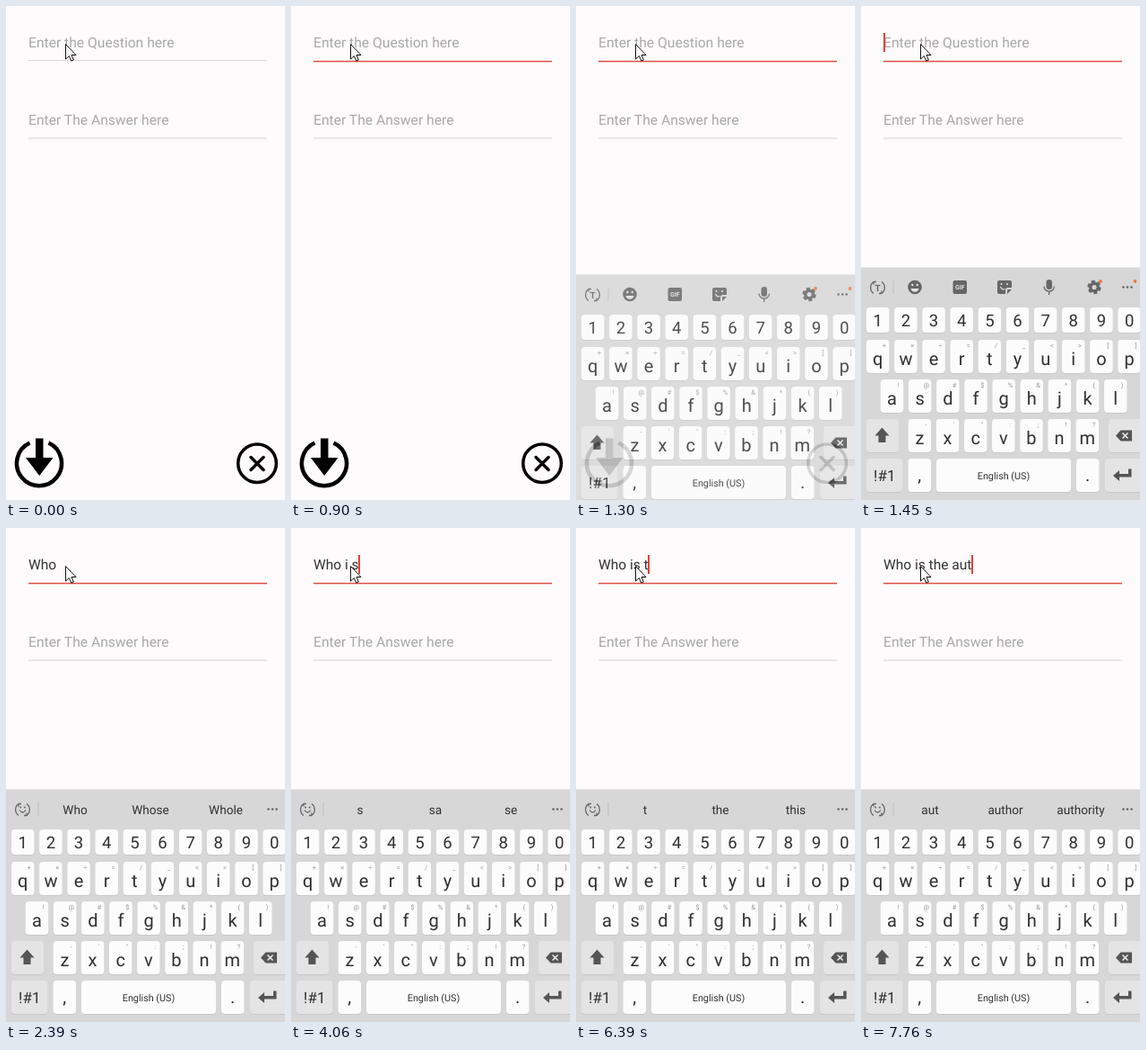
Animation of 311 by 549 pixels, one loop 8000 ms. Source, as an HTML page:

```html
<!DOCTYPE html>
<html lang="en">
<head>
<meta charset="utf-8">
<title>Question form</title>
<style>
html, body { margin: 0; width: 100%; height: 100%; overflow: hidden; background: #fdfbfc; }
svg { display: block; }
text { font-family: Roboto, Arial, sans-serif; white-space: pre; text-rendering: geometricPrecision; }
.mid { text-anchor: middle; fill: #303030; }
.field { font-size: 15.5px; fill: #333; }
.hint { font-size: 15.65px; fill: #a9a8a9; }
.tiny { font-size: 7.5px; fill: #999; }
.line { fill: none; stroke: #666; stroke-width: 1.3; }
.icon { fill: #666; }
.dot { fill: #ee7a3c; }
</style>
</head>
<body>
<svg id="stage" width="311" height="549" viewBox="0 0 311 549">
  <rect width="311" height="549" fill="#fdfbfc"/>
  <rect id="rule" x="25" width="266"/>
  <rect x="25" y="146.5" width="266" height="1" fill="#d3d1d2"/>
  <text class="field" id="question" x="25" y="46"></text>
  <text class="field hint" x="25" y="132">Enter The Answer here</text>
  <rect id="caret" y="30" width="2" height="21" fill="#e2423a"/>

  <g fill="none" stroke="#000">
    <path d="M26.5 485.5A25 25 0 1 0 47.5 485.5" stroke-width="4.5"/>
    <path d="M33 480.5H41.5V502H52.5L37.2 522L22 502H33Z" fill="#000" stroke="none"/>
    <circle cx="280" cy="508.3" r="21.3" stroke-width="3.5"/>
    <path d="M273 501.5L287 515.5M287 501.5L273 515.5" stroke-width="3.4" stroke-linecap="round"/>
  </g>

  <g id="keyboard">
    <rect y="290.5" width="311" height="300" fill="#d7d7d7"/>
    <g id="keys"></g>
    <g fill="#555">
      <path d="M23.5 468.500L31.500 477.500H27.500V485H19.500V477.500H15.500Z"/>
      <path d="M284 477.500L289.500 471.500H302V483.500H289.500Z"/>
      <path d="M291.500 474.500L297.500 480.500M297.500 474.500L291.500 480.500" stroke="#eee" stroke-width="1.500"/>
      <path d="M281 522L288 516V520H298V514.500H301.500V523.500H288V528Z"/>
    </g>
    <g class="line">
      <path d="M14 306.500A8 8 0 0 0 14 319.500M23 306.500A8 8 0 0 1 23 319.500M14 306.500H17M14 306.500V309.500M23 319.500H20M23 319.500V316.500"/>
      <path d="M36 305V320" stroke="#c5c5c5"/>
    </g>
    <g class="icon">
      <circle cx="292.5" cy="312.5" r="1.3"/>
      <circle cx="297" cy="312.5" r="1.3"/>
      <circle cx="301.5" cy="312.5" r="1.3"/>
    </g>
    <g id="tools" class="icon">
      <text x="18.5" y="316.5" font-size="10" font-weight="700" text-anchor="middle">T</text>
      <circle cx="60" cy="312.5" r="7.8"/>
      <path d="M55.5 314H64.5A4.6 4.6 0 0 1 55.5 314" fill="#e2e2e2"/>
      <circle cx="57.3" cy="310" r="1.2" fill="#e2e2e2"/>
      <circle cx="62.7" cy="310" r="1.2" fill="#e2e2e2"/>
      <rect x="102.5" y="305" width="15.5" height="15" rx="2"/>
      <text x="110.3" y="315.3" font-size="7" font-weight="700" text-anchor="middle" fill="#e2e2e2">GIF</text>
      <path d="M154 305H166Q168 305 168 307V313H164Q161 313 161 316V320H154Q152 320 152 318V307Q152 305 154 305ZM163 320V316Q163 315 164 315H168Z"/>
      <path d="M155.5 312Q157 316 160.5 314.5" class="line" style="stroke:#ddd"/>
      <circle cx="156.5" cy="309" r="1.1" fill="#ddd"/>
      <circle cx="163" cy="309" r="1.1" fill="#ddd"/>
      <rect x="206.5" y="304" width="6.5" height="11" rx="3.25"/>
      <path class="line" d="M204 311.5A5.7 5.7 0 0 0 215.4 311.5M209.7 317V321"/>
      <circle cx="260" cy="312.5" r="4.3" fill="none" stroke="#666" stroke-width="3.5"/>
      <circle cx="260" cy="312.5" r="6.6" fill="none" stroke="#666" stroke-width="2.2" stroke-dasharray="4 2.91"/>
      <circle class="dot" cx="267" cy="306" r="1.9"/>
      <circle class="dot" cx="305.5" cy="306" r="1.9"/>
    </g>
    <g id="suggest">
      <path class="line" d="M15 313.500Q18.500 318.500 22 313.500"/>
      <circle class="icon" cx="16.2" cy="310.5" r="1"/>
      <circle class="icon" cx="20.8" cy="310.5" r="1"/>
      <text class="mid word" x="77" y="318" font-size="13.6"></text>
      <text class="mid word" x="161" y="318" font-size="13.6"></text>
      <text class="mid word" x="245" y="318" font-size="13.6"></text>
    </g>
  </g>

  <path transform="translate(66.5 42.5)" d="M0 0V16.500L3.800 13L6.300 18.600L8.800 17.500L6.500 12H11.500Z" fill="#fff" stroke="#111"/>
</svg>
<script>
const $ = id => document.getElementById(id);
const show = (el, on) => el.style.display = on ? "" : "none";
const PITCH = 31.15;

function add(tag, attrs, text = "") {
  const el = document.createElementNS("http://www.w3.org/2000/svg", tag);
  for (const k in attrs) el.setAttribute(k, attrs[k]);
  el.textContent = text;
  $("keys").append(el);
}

function key(x, y, w, h, label, size, base, fill = "#fcfcfc") {
  add("rect", { x, y: y + 1, width: w, height: h, rx: 4, fill: "#c8c8c8" });
  add("rect", { x, y, width: w, height: h, rx: 4, fill });
  add("text", { class: "mid", x: x + w / 2, y: y + base, "font-size": size }, label);
}

function row(chars, marks, x, y, h, size, base) {
  [...chars].forEach((c, i) => {
    const left = x + i * PITCH;
    key(left, y, 25.5, h, c, size, base);
    add("text", { class: "mid tiny", style: "fill:#999", x: left + 20, y: y + 9 }, marks[i] || "");
  });
}

const GREY = "#e4e4e4";
row("1234567890", "", 6, 335, 28, 18.5, 20.5);
row("qwertyuiop", "+×÷=/_<>[]", 6, 371, 37, 20, 27.5);
row("asdfghjkl", "!@#$%&*()", 21.8, 415, 37, 20, 27.5);
row("zxcvbnm", "-'\":;!?", 52.6, 459, 37, 20, 27.5);
key(6, 459, 36, 37, "", 20, 28, GREY);
key(276, 459, 38, 37, "", 20, 28, GREY);
key(6, 503, 40.5, 37, "!#1", 17, 24.5, GREY);
key(52.5, 503, 25.5, 37, ",", 20, 25);
key(84, 503, 150, 37, "English (US)", 10.8, 22.5);
key(240, 503, 25.5, 37, ".", 20, 25);
key(272, 503, 42, 37, "", 20, 25, GREY);

// start time, typed text, caret shown, suggestions
const STEPS = [
  [0, "", 0], [530, "", 1], [900, "", 0], [1450, "", 1],
  [1600, "W", 1, "W What Will"],
  [1720, "Wh", 1, "Wh What Who"],
  [2000, "Who", 1, "Who Whose Whole"],
  [2390, "Who", 0, "Who Whose Whole"],
  [2910, "Who", 1, "Who Whose Whole"],
  [3200, "Who ", 1, "is was are"],
  [3500, "Who i", 1, "i is in"],
  [3910, "Who i ", 1, "am do is"],
  [4060, "Who i s", 1, "s sa se"],
  [4580, "Who i ", 1, "am do is"],
  [4730, "Who i", 1, "i is in"],
  [5270, "Who is", 1, "is isn't issue"],
  [5530, "Who is ", 1, "the your going"],
  [5940, "Who is ", 0, "the your going"],
  [6090, "Who is t", 0, "t the this"],
  [6390, "Who is t", 1, "t the this"],
  [6640, "Who is th", 1, "th the that"],
  [6790, "Who is the", 1, "the then there"],
  [6940, "Who is the ", 1, "best same following"],
  [7210, "Who is the a", 1, "a and all"],
  [7450, "Who is the au", 1, "au aunt author"],
  [7760, "Who is the aut", 1, "aut author authority"]
];

// start time, keyboard drop, keyboard opacity
const SLIDE = [[0, 0, 0], [1170, 32, .5], [1300, 8, .85], [1450, 0, 1]];
// start time, top, height, colour
const RULE = [[0, 60, 1, "#d8d6d7"], [130, 60, 1.5, "#e5a09a"], [260, 60.8, 1.5, "#dd4f43"]];

const at = (list, t) => list.findLast(s => s[0] <= t);
const words = document.querySelectorAll(".word");
const question = $("question");

function draw() {
  const t = performance.now() % 8000;
  const [, typed, caret, list] = at(STEPS, t);
  question.textContent = typed || "Enter the Question here";
  question.classList.toggle("hint", !typed);
  $("caret").setAttribute("x", 25 + (typed ? Math.floor(question.getComputedTextLength()) : 0));
  show($("caret"), caret);

  show($("tools"), !list);
  show($("suggest"), list);
  if (list) list.split(" ").forEach((w, i) => words[i].textContent = w);

  const [, drop, alpha] = at(SLIDE, t);
  $("keyboard").setAttribute("transform", `translate(0 ${drop})`);
  $("keyboard").setAttribute("opacity", alpha);

  const [, y, height, fill] = at(RULE, t);
  for (const [k, v] of Object.entries({ y, height, fill })) $("rule").setAttribute(k, v);
  requestAnimationFrame(draw);
}
draw();
</script>
</body>
</html>
```
